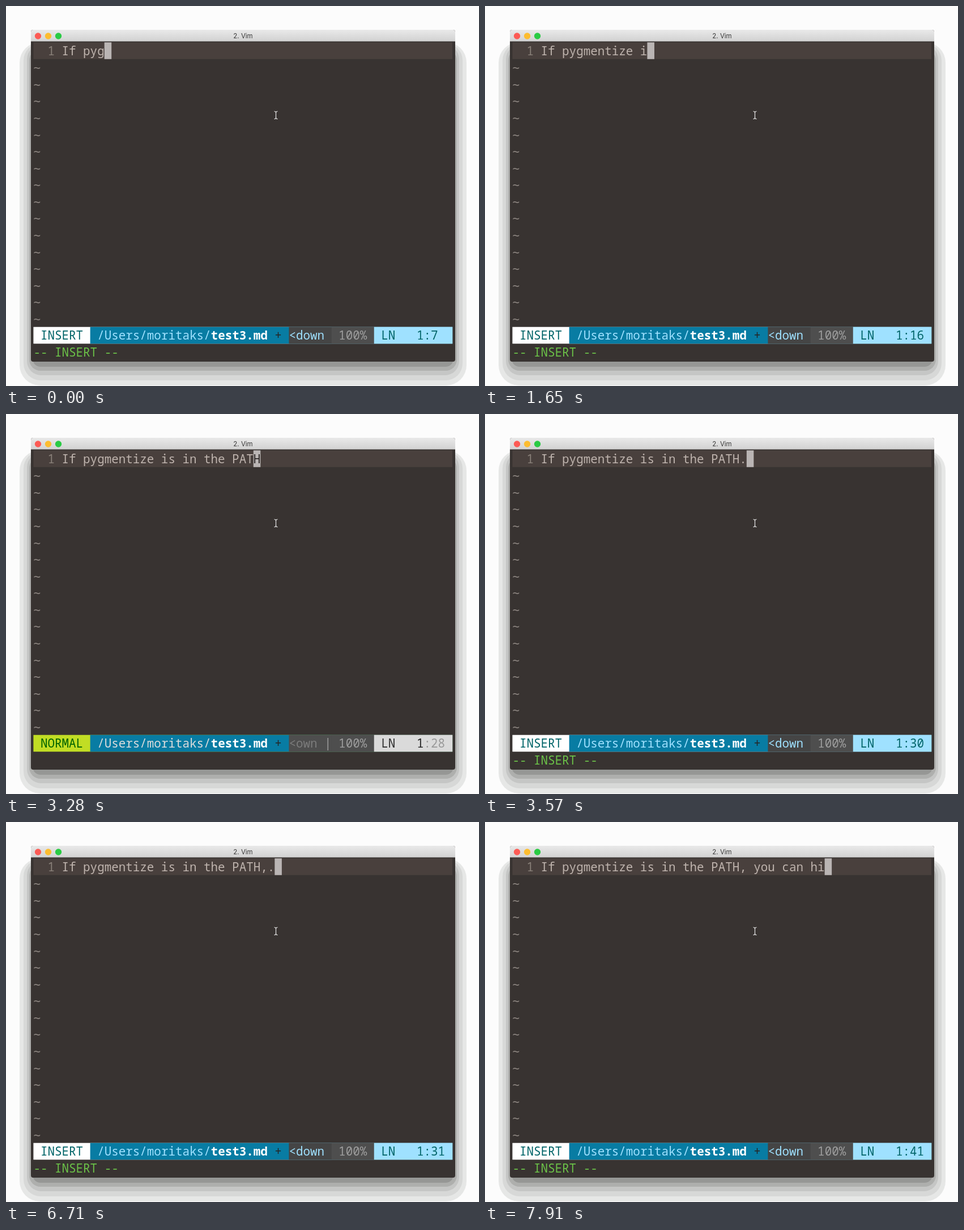
An HTML page with a canvas for the animation above (8 s loop, 835 px wide and 671 px high).

```html
<!DOCTYPE html>
<html>
<head>
<meta charset="utf-8">
<style>
html, body { margin: 0; width: 100%; height: 100%; overflow: hidden; background: #fcfcfc; }
canvas { display: block; }
</style>
</head>
<body>
<canvas width="835" height="671"></canvas>
<script>
const ctx = document.querySelector('canvas').getContext('2d');
const LOOP = 8000, CW = 12.528, RH = 29.56, X0 = 48.4, Y0 = 64.2, LAST_COL = 59.05;
const MONO = '"Noto Sans Mono", "DejaVu Sans Mono", monospace';
const SENTENCE = 'If pygmentize is in the PATH, you can hi';

// [start ms, letters typed, flags]: "." trailing full stop, "n" normal mode, "x" cursor off
const STEPS = [
  [0, 6], [150, 7], [300, 9], [450, 10], [750, 11], [900, 12], [1200, 13, '.'],
  [1650, 15], [1800, 17], [1950, 19], [2100, 21], [2250, 23], [2390, 23, '.'],
  [2690, 25], [2840, 27], [2980, 28], [3280, 28, 'n'], [3420, 28], [3570, 28, '.'],
  [5210, 28, '.x'], [5810, 28], [6710, 29, '.'],
  [7010, 30], [7160, 32], [7310, 33], [7460, 35], [7610, 37, '.'], [7910, 40]
];

const colX = col => X0 + col * CW;
const rowY = row => Y0 + row * RH;

function text(str, col, row, color, weight = 400, family = MONO) {
  ctx.font = `${weight} 20.88px ${family}`;
  ctx.fillStyle = color;
  ctx.fillText(str, colX(col), rowY(row) + 22.6);
}

function cells(col, row, color, count = LAST_COL - col) {
  ctx.fillStyle = color;
  ctx.fillRect(colX(col), rowY(row), count * CW, RH);
}

function box(left, top, right, bottom, radius, color) {
  ctx.fillStyle = color;
  ctx.beginPath();
  ctx.roundRect(left, top, right - left, bottom - top, radius);
  ctx.fill();
}

function drawWindow() {
  box(0, 0, 835, 671, 0, '#fcfcfc');
  box(24, 64, 813, 670, 36, '#e6e7e6');
  box(31, 66, 806, 661, 30, '#d7d8d7');
  box(37, 69, 800, 652, 25, '#c5c6c5');
  box(41, 76, 796, 644, 20, '#aeafad');
  box(47, 90, 790, 637, 14, '#969795');
  box(44, 42, 793, 628, 4, '#383331');

  const bar = ctx.createLinearGradient(0, 42, 0, 63);
  bar.addColorStop(0, '#e9e9e9');
  bar.addColorStop(1, '#d1d1d1');
  box(44, 42, 793, 62.5, [4, 4, 0, 0], bar);
  ['#fc5b55', '#fdbd30', '#2acb44'].forEach((color, i) => {
    const x = 56.5 + i * 18;
    box(x - 5.7, 47.3, x + 5.7, 58.7, 5.7, color);
  });
  ctx.font = '11.5px Inter, sans-serif';
  ctx.fillStyle = '#383838';
  ctx.textAlign = 'center';
  ctx.fillText('2. Vim', 418.5, 57);
  ctx.textAlign = 'left';
}

function drawBuffer(str, cursor, normal, cursorOn) {
  cells(0, 0, '#49403d');
  text('1', 2, 0, '#898079');
  text(str, 4, 0, '#beb3ad');
  if (cursorOn) {
    cells(cursor + 4, 0, '#bab5b4', 1);
    if (normal) text(str[cursor], cursor + 4, 0, '#2a2524', 500);
  }
  for (let row = 1; row < 17; row++) {
    text('~', 0, row, '#8c8580', 400, '"DejaVu Sans Mono", monospace');
  }
}

// Each section is painted to the right edge and the next one covers it.
function drawStatus(cursor, normal) {
  const row = 17, light = '#9fe1ff', teal = '#006468';
  cells(0, row, normal ? '#c1dd24' : '#ffffff');
  text(normal ? 'NORMAL' : 'INSERT', 1, row, normal ? '#006400' : teal, 500);

  cells(8, row, '#087ca3');
  text('/Users/moritaks/', 9, row, normal ? '#dcdcdc' : light);
  text('test3.md', 25, row, '#ffffff', 600);
  text('+', 34, row, '#252525', 500);

  cells(36, row, normal ? '#4e4e4e' : '#454545');
  cells(42, row, '#4e4e4e');
  text(normal ? '<own' : '<down', 36, row, normal ? '#7c7c7c' : light);
  if (normal) text('|', 41, row, '#9e9e9e');
  text('100%', 43, row, '#9e9e9e');

  cells(48, row, normal ? '#dadada' : light);
  text('LN', 49, row, normal ? '#303030' : teal, 500);
  text('1', 54, row, normal ? '#202020' : teal, 500);
  text(':' + (cursor + 1), 55, row, normal ? '#999999' : teal, normal ? 400 : 500);
  if (!normal) text('-- INSERT --', 0, 18, '#6bc148', 500);
}

function drawPointer() {
  ctx.beginPath();
  for (const [end, joint] of [[186, 188.5], [199.5, 197]]) {
    ctx.moveTo(473.5, end);
    ctx.quadraticCurveTo(476.5, end, 476.5, joint);
    ctx.quadraticCurveTo(476.5, end, 479.5, end);
  }
  ctx.moveTo(476.5, 188.5);
  ctx.lineTo(476.5, 197);
  ctx.strokeStyle = '#e4e4e4';
  ctx.lineWidth = 1.2;
  ctx.stroke();
}

function frame(now) {
  const t = now % LOOP;
  const [, typed, flags = ''] = STEPS.findLast(step => step[0] <= t) || STEPS[0];
  const normal = flags.includes('n');
  const str = SENTENCE.slice(0, typed) + (flags.includes('.') ? '.' : '');
  const cursor = str.length - (normal ? 1 : 0);
  drawWindow();
  drawBuffer(str, cursor, normal, !flags.includes('x'));
  drawStatus(cursor, normal);
  drawPointer();
  requestAnimationFrame(frame);
}
requestAnimationFrame(frame);
</script>
</body>
</html>
```
